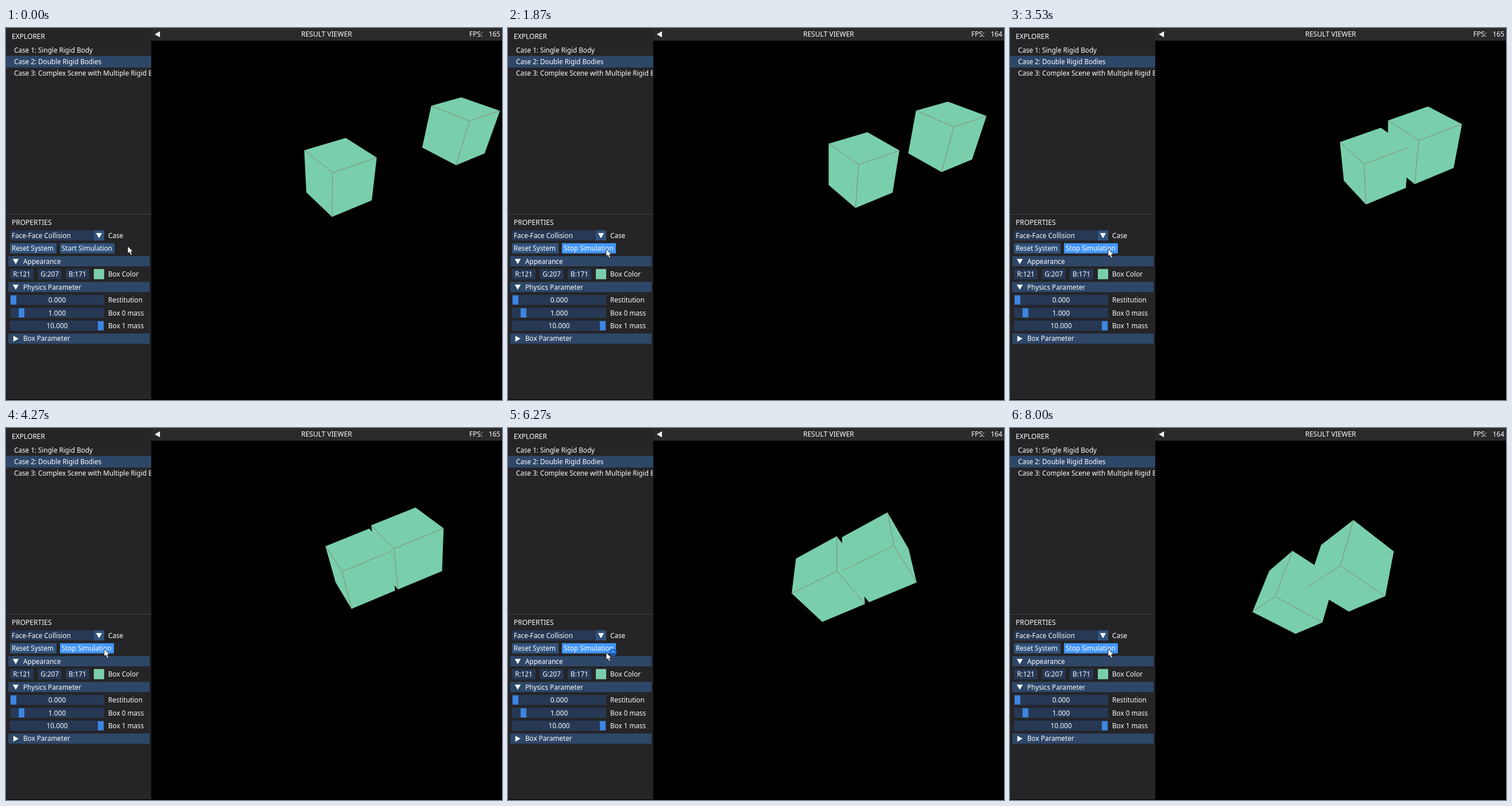
An HTML page with a canvas that plays this animation: 864x648 px, repeating every 8070 ms.

```html
<!DOCTYPE html>
<html lang="en">
<head>
<meta charset="utf-8">
<title>Rigid body viewer</title>
<style>
  html, body { margin: 0; width: 100%; height: 100%; overflow: hidden; background: #000; }
  canvas { display: block; }
</style>
</head>
<body>
<canvas id="stage" width="864" height="648"></canvas>
<script>
const ctx = document.getElementById('stage').getContext('2d');
const { sin, cos, tan, PI, SQRT2, floor, min, max } = Math;
const LOOP = 8070, STEP = 200 / 3;
const BG = '#252427', HEADER = '#2e4768', FRAME = '#263854', BUTTON = '#31527b',
      HOVER = '#4296fa', GRAB = '#3d85e0', BOX = '#79cfab', CREASE = '#8f8c7e';

// Unit boxes; world axes are [approach direction, down, away from the viewer].
const START = 820;                  // the simulation starts
const SPEED = 0.0005;               // of each box, units per ms
const GAP = 3, OFFSET = -0.4;       // the heavy box as seen from the light one
const FLIGHT = (GAP - 1) / 2 / SPEED;
const SHARE = 10 / 11;              // the heavy box's share of the mass
const SPIN = 0.000256, SLIDE = 0.000245;

// 60 degree camera in the middle of the viewer.
const PITCH = 40 * PI / 180, YAW = 57 * PI / 180, FOCAL = 313 / tan(PI / 6);
const EYE = { right: 0.253, down: 3.365, ahead: 5.402 };

function project([n, down, m]) {
  const x = EYE.right + n * sin(YAW) - m * cos(YAW);
  const d = EYE.down + down;
  const f = EYE.ahead + n * cos(YAW) + m * sin(YAW);
  const z = d * sin(PITCH) + f * cos(PITCH);
  return [558.5 + FOCAL * x / z, 335 + FOCAL * (d * cos(PITCH) - f * sin(PITCH)) / z];
}

// Box centres and common turn. After the impact the faces stay in contact:
// the pair drifts and turns while one face slides along the other.
function simulate(t) {
  const run = max(0, t - START);
  if (run < FLIGHT) {
    const s = SPEED * run;
    return { turn: 0, light: [s, 0, 0], heavy: [GAP - s, OFFSET, OFFSET] };
  }
  const after = run - FLIGHT;
  const turn = SPIN * after, slide = OFFSET * SQRT2 + SLIDE * after;
  const side = (slide * cos(turn) - sin(turn)) / SQRT2;
  const apart = [cos(turn) + slide * sin(turn), side, side];
  const middle = [1 + SHARE + (1 - 2 * SHARE) * SPEED * after, SHARE * OFFSET, SHARE * OFFSET];
  const at = k => middle.map((v, i) => v + k * apart[i]);
  return { turn, light: at(-SHARE), heavy: at(1 - SHARE) };
}

// Corners a b c d run round the top, e f g h lie below them.
function corners(centre, turn) {
  const v = {};
  [...'abcdefgh'].forEach((name, i) => {
    const x = i % 4 === 1 || i % 4 === 2 ? 0.5 : -0.5;
    const y = i < 4 ? -0.5 : 0.5;
    const z = i % 4 < 2 ? 0.5 : -0.5;
    const u = (y + z) / SQRT2, k = (y - z) / SQRT2;
    const w = u * cos(turn) - x * sin(turn);
    v[name] = project([
      centre[0] + x * cos(turn) + u * sin(turn),
      centre[1] + (w + k) / SQRT2,
      centre[2] + (w - k) / SQRT2
    ]);
  });
  return v;
}

const FACES = { top: 'abcd', front: 'dcgh', left: 'adhe', right: 'cbfg' };
const CREASES = [['top', 'front', 'dc'], ['top', 'left', 'ad'], ['top', 'right', 'bc'],
                 ['front', 'left', 'dh'], ['front', 'right', 'cg']];

function facing(v, name) {
  const [p, q, r] = [...FACES[name]].map(k => v[k]);
  return (q[0] - p[0]) * (r[1] - q[1]) - (q[1] - p[1]) * (r[0] - q[0]) > 0;
}

function path(points) {
  ctx.beginPath();
  points.forEach(p => ctx.lineTo(...p));
}

function fillShape(points, color) {
  path(points);
  ctx.closePath();
  ctx.fillStyle = color;
  ctx.fill();
}

function drawBox(v) {
  const seen = {};
  for (const name in FACES) {
    seen[name] = facing(v, name);
    if (seen[name]) fillShape([...FACES[name]].map(k => v[k]), BOX);
  }
  ctx.strokeStyle = CREASE;
  ctx.lineWidth = 1;
  for (const [one, two, edge] of CREASES) {
    if (!seen[one] || !seen[two]) continue;
    path([...edge].map(k => v[k]));
    ctx.stroke();
  }
}

function rect(x, y, w, h, color) {
  ctx.fillStyle = color;
  ctx.fillRect(x, y, w, h);
}

function text(str, x, mid, size = 11.7, align = 'left') {
  ctx.font = `${size}px "Noto Sans", "Open Sans", sans-serif`;
  ctx.textAlign = align;
  ctx.fillStyle = '#fff';
  ctx.fillText(str, x, mid + 4.3);
}

function arrow(x, y, turn) {
  ctx.save();
  ctx.translate(x, y);
  ctx.rotate(turn * PI / 2);
  fillShape([[-5.2, -4.2], [5.2, -4.2], [0, 4.8]], '#fff');
  ctx.restore();
}

const row = i => 361.4 + 22.47 * i;
const bar = (x, right, i, color) => rect(x, row(i) - 9, right - x, 17.8, color);

function section(i, label, turn) {
  bar(4, 250, i, HEADER);
  arrow(17, row(i), turn);
  text(label, 30, row(i));
}

function slider(i, value, grab, label) {
  bar(7, 171, i, FRAME);
  rect(grab, row(i) - 8, 10, 16, GRAB);
  text(value, 89, row(i), 11.9, 'center');
  text(label, 178, row(i));
}

function drawPanel(t, cursorX) {
  rect(0, 0, 253, 647, BG);
  ctx.save();
  ctx.beginPath();
  ctx.rect(0, 0, 253, 648);
  ctx.clip();
  text('EXPLORER', 10, 14.7, 12);
  rect(0, 48.6, 253, 20.2, HEADER);
  ['Single Rigid Body', 'Double Rigid Bodies', 'Complex Scene with Multiple Rigid Bodies']
    .forEach((name, i) => text(`Case ${i + 1}: ${name}`, 14, 38.7 + 20.2 * i));
  ctx.restore();

  rect(0, 324, 253, 1, '#434248');
  text('PROPERTIES', 10, 338.7, 12);
  bar(7, 153, 0, FRAME);
  bar(153, 171, 0, BUTTON);
  arrow(162, row(0), 0);
  text('Face-Face Collision', 10, row(0));
  text('Case', 178, row(0));

  const running = t >= START - STEP;
  bar(7, 88, 1, BUTTON);
  text('Reset System', 10, row(1));
  bar(94, running ? 188 : 189, 1, cursorX < 189 ? HOVER : BUTTON);
  text(running ? 'Stop Simulation' : 'Start Simulation', 97, row(1));

  section(2, 'Appearance', 0);
  ['R:121', 'G:207', 'B:171'].forEach((label, i) => {
    const x = 7 + 48.5 * i;
    bar(x, x + 41, 3, FRAME);
    text(label, x + 20.5, row(3), 11.7, 'center');
  });
  bar(153, 171, 3, BOX);
  text('Box Color', 178, row(3));

  section(4, 'Physics Parameter', 0);
  slider(5, '0.000', 8, 'Restitution');
  slider(6, '1.000', 22, 'Box 0 mass');
  slider(7, '10.000', 160, 'Box 1 mass');
  section(8, 'Box Parameter', -1);
}

function drawViewer(t) {
  rect(253, 0, 611, 22, '#2a292c');
  arrow(264, 11, 1);
  text('RESULT VIEWER', 558.5, 11, 12, 'center');
  text('FPS:', 807, 11, 12);
  text(t < 1330 || (t >= 3070 && t < 6200) ? '165' : '164', 861, 11, 11.8, 'right');

  const pose = simulate(t);
  const light = corners(pose.light, pose.turn), heavy = corners(pose.heavy, pose.turn);
  // The box on the viewer's side of the contact plane covers the other.
  const order = facing(light, 'right') ? [light, heavy] : [heavy, light];
  order.forEach(drawBox);
}

function drawCursor(x, y, busy) {
  if (busy) {
    ctx.beginPath();
    ctx.arc(x + 12, y, 5, 0, PI * 2);
    ctx.strokeStyle = '#1565c0';
    ctx.lineWidth = 2.8;
    ctx.stroke();
  }
  const shape = [[0, 0], [0, 13], [3, 10.4], [5.2, 15.6], [7.6, 14.6], [5.4, 9.6], [9.4, 9.4]];
  fillShape(shape.map(p => [p[0] + x, p[1] + y]), '#fff');
  ctx.strokeStyle = '#111';
  ctx.lineWidth = 0.8;
  ctx.stroke();
}

function draw(now) {
  const t = min(120, floor((now % LOOP + 3.5) / STEP)) * STEP;
  const u = min(1, max(0, (t - 130) / 470));
  const ease = u * u * (3 - 2 * u);
  const busy = t >= 6200 && t < 6400;
  const x = 212 - 41 * ease, y = 380 + 5 * ease + (busy ? 6 : 0);

  rect(0, 0, 864, 648, '#000');
  drawPanel(t, x);
  drawViewer(t);
  drawCursor(x, y, busy);
}

const begin = performance.now();
function tick() {
  draw(performance.now() - begin);
  requestAnimationFrame(tick);
}
tick();
</script>
</body>
</html>
```
